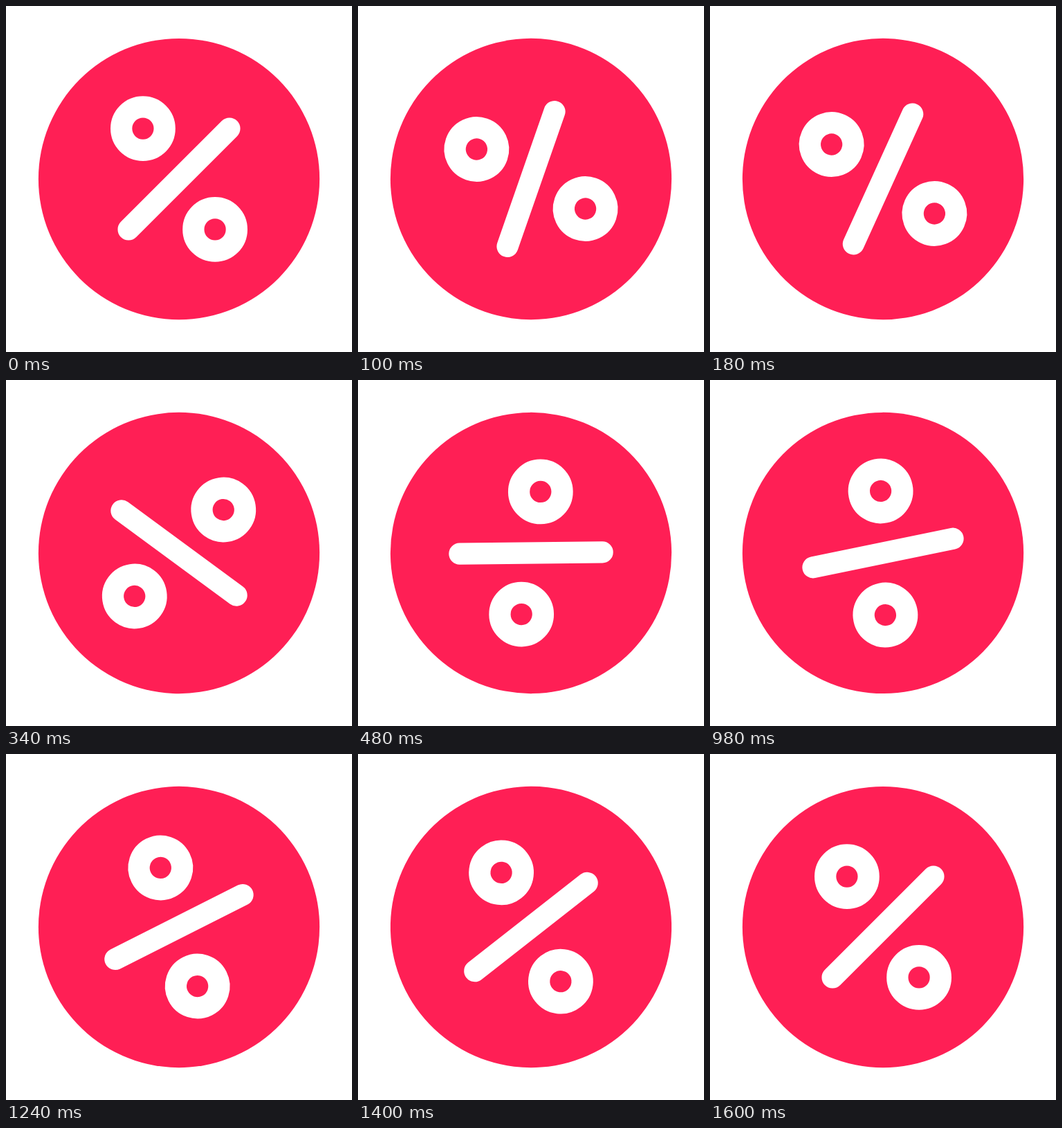
Recreate the animation shown at these times as an HTML page. Size 500 by 500 pixels, loop 2.4 s.

```html
<!DOCTYPE html>
<html lang="en">
<head>
<meta charset="utf-8">
<title>Spinning percent badge</title>
<style>
  html, body { margin: 0; width: 100%; height: 100%; overflow: hidden; background: #fff; }
  svg { display: block; width: 100%; height: 100%; }
</style>
</head>
<body>
<svg viewBox="-24 -24 48 48">
  <g id="badge">
    <circle r="19.5" fill="#ff1f55"/>
    <g fill="none" stroke="#fff" stroke-width="3" stroke-linecap="round">
      <circle cx="-5" cy="-7" r="3"/>
      <circle cx="5" cy="7" r="3"/>
      <path d="M-7 7 7-7"/>
    </g>
  </g>
</svg>
<script>
const LOOP = 2400, STEP = 20;
const badge = document.getElementById('badge');

// Wind up, spin past a full turn, settle back, rest.
const keys = [
  { time: 0, angle: 0, ease: [0.364, 0.636] },
  { time: 125, angle: -28.5, ease: [0.364, 0.636] },
  { time: 759, angle: 397.5, ease: [0.469, 0.7] },
  { time: 1600, angle: 360 }
];

// Cubic Bezier easing with flat ends: (x1, 0, x2, 1).
function bezier(x, [x1, x2]) {
  let low = 0, high = 1, u = 0.5;
  for (let i = 0; i < 30; i++) {
    u = (low + high) / 2;
    const v = 1 - u;
    if (3 * u * v * v * x1 + 3 * u * u * v * x2 + u ** 3 < x) low = u;
    else high = u;
  }
  return u * u * (3 - 2 * u);
}

function angleAt(time) {
  const next = keys.findIndex(key => key.time > time);
  if (next < 0) return 0;
  const from = keys[next - 1], to = keys[next];
  const progress = (time - from.time) / (to.time - from.time);
  return from.angle + (to.angle - from.angle) * bezier(progress, from.ease);
}

function draw() {
  const time = Math.floor(performance.now() % LOOP / STEP) * STEP;
  badge.setAttribute('transform', `rotate(${angleAt(time)})`);
  requestAnimationFrame(draw);
}
draw();
</script>
</body>
</html>
```
